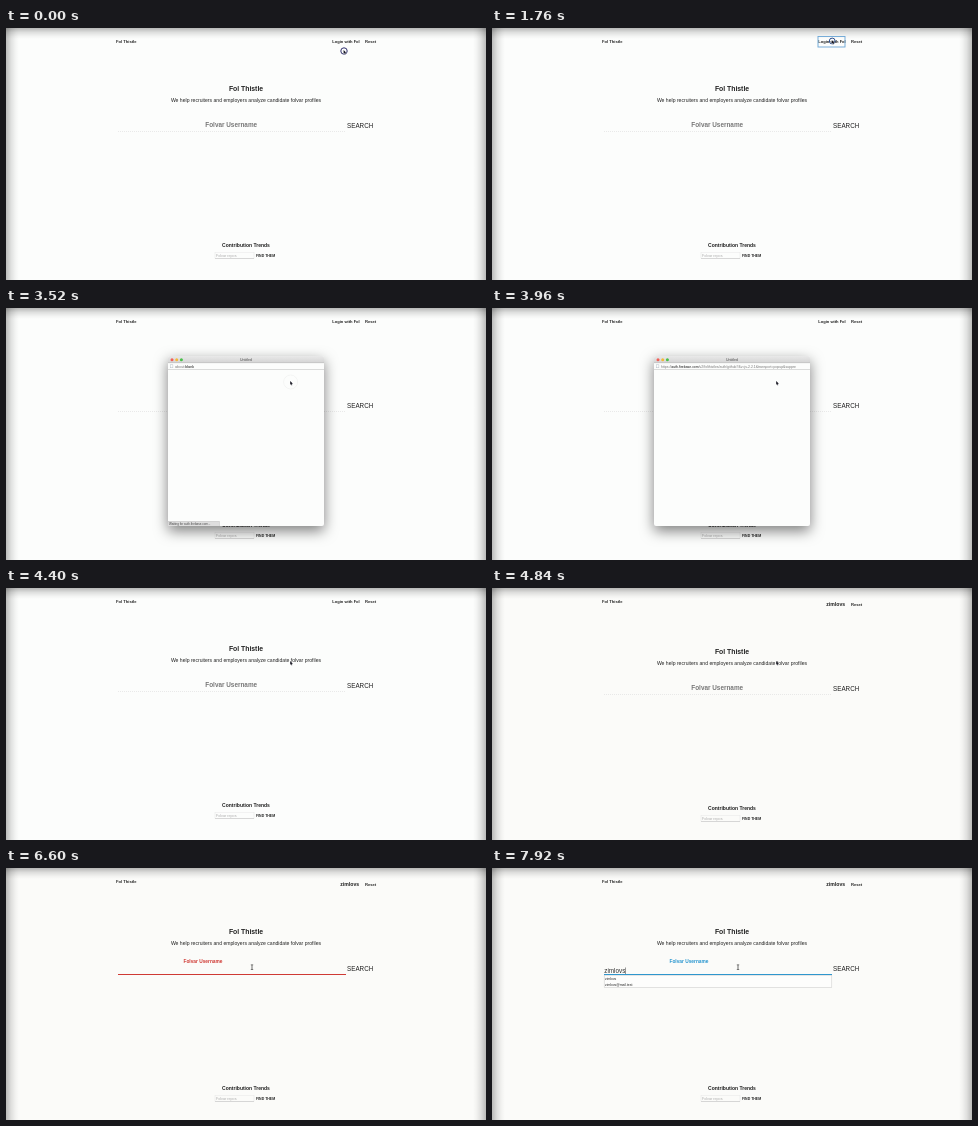
Animation, 480 px wide and 252 px high, one loop 8 s. Source, as an HTML page with a canvas:

```html
<!DOCTYPE html>
<html lang="en">
<head>
<meta charset="utf-8">
<title>Profile search</title>
<style>
  html, body { margin: 0; width: 100%; height: 100%; overflow: hidden; background: #fcfdfc; }
  canvas { display: block; width: 480px; height: 252px; }
</style>
</head>
<body>
<canvas id="stage"></canvas>
<script>
const W = 480, H = 252, LOOP = 8000, STEP = 440;
const canvas = document.getElementById('stage');
const ctx = canvas.getContext('2d');
const ratio = window.devicePixelRatio || 1;
canvas.width = W * ratio;
canvas.height = H * ratio;

const BRAND = 'Fol Thistle', USER = 'zimlovs';
const RED = '#cf3a35', BLUE = '#2795cf', INK = '#222';

// Pointer poses: start time, position, shape, ring radius, ring colour
const POINTER = [
  [0, 337.6, 22, 'arrow', 3.2, '#30306e'],
  [880, 243.5, 56.5, 'beam'],
  [1320, 337.4, 22, 'arrow', 4.7, 'rgba(70,70,110,.3)'],
  [1760, 339.8, 12, 'arrow', 2.9, '#2c4d8c'],
  [2200, 339.8, 12, 'arrow', 4.2, 'rgba(60,60,70,.42)'],
  [2640, 339.8, 12, 'arrow'],
  [3080, 284.2, 73, 'arrow'],
  [3520, 284.2, 73, 'arrow', 7, 'rgba(0,0,0,.035)'],
  [3960, 284.2, 73, 'arrow'],
  [5280, 246, 99.2, 'beam'],
  [5720, 246, 99.2, 'beam', 2.8, '#333'],
  [6160, 246, 99.2, 'beam', 4, 'rgba(60,60,60,.25)'],
  [6600, 246, 99.2, 'beam']
];

const lerp = (a, b, p) => a + (b - a) * p;

function text(str, x, y, size, { bold = false, color = INK, align = 'left' } = {}) {
  ctx.font = `${bold ? 'bold ' : ''}${size}px "Liberation Sans", Arial, sans-serif`;
  ctx.fillStyle = color;
  ctx.textAlign = align;
  ctx.fillText(str, x, y);
  return ctx.measureText(str).width;
}

function rect(x, y, w, h, color) {
  ctx.fillStyle = color;
  ctx.fillRect(x, y, w, h);
}

function frame(x, y, w, h, color, line = 0.5) {
  ctx.strokeStyle = color;
  ctx.lineWidth = line;
  ctx.strokeRect(x, y, w, h);
}

function disc(x, y, r, color) {
  ctx.fillStyle = color;
  ctx.beginPath();
  ctx.arc(x, y, r, 0, Math.PI * 2);
  ctx.fill();
}

function edge(x0, y0, x1, y1, strength) {
  const g = ctx.createLinearGradient(x0, y0, x1, y1);
  g.addColorStop(0, `rgba(0,0,0,${strength})`);
  g.addColorStop(0.4, `rgba(0,0,0,${strength * 0.42})`);
  g.addColorStop(0.75, `rgba(0,0,0,${strength * 0.12})`);
  g.addColorStop(1, 'rgba(0,0,0,0)');
  ctx.fillStyle = g;
  ctx.fillRect(0, 0, W, H);
}

function backdrop(t) {
  rect(0, 0, W, H, t < 4840 ? '#fcfdfc' : '#fbfbf9');
  edge(0, 0, 0, 11, 0.28);
  edge(0, 0, 13, 0, 0.26);
  edge(W, 0, W - 13, 0, 0.26);
}

function header(t) {
  text(BRAND, 110, 14.5, 4.1, { bold: true });
  if (t < 4840) {
    text('Login with Fol', 326.3, 15.4, 4.05, { bold: true });
    text('Reset', 359, 15.4, 4.1, { bold: true });
  } else {
    text(USER, 334.3, 17.6, 5.15, { bold: true });
    text('Reset', 359, 17.6, 4.1, { bold: true });
  }
  if (t === 1760) frame(326, 8.5, 27, 10.5, '#69a5d6', 0.9);
}

function searchField(t, shift) {
  const focused = t >= 5720;
  const typed = USER.slice(0, t < 7040 ? 0 : t < 7480 ? 2 : t < 7920 ? 5 : 7);
  const accent = typed ? BLUE : RED;
  const float = t < 5720 ? 0 : t < 6160 ? 0.36 : 1;

  text('Folvar Username', lerp(199.3, 177.5, float), lerp(98.5 + shift, 95, float),
    6.4 * lerp(1, 0.75, float), { bold: true, color: focused ? accent : '#777' });

  if (!focused) {
    ctx.setLineDash([1, 1]);
    ctx.strokeStyle = '#dcdddc';
    ctx.lineWidth = 0.6;
    ctx.beginPath();
    ctx.moveTo(112, 103.3 + shift);
    ctx.lineTo(340, 103.3 + shift);
    ctx.stroke();
    ctx.setLineDash([]);
  } else {
    rect(112, 106, 228, 1, accent);
    const width = text(typed, 112.3, 105, 6.3, { color: '#333' });
    if (t !== 6600) rect(112.3 + width, 99.5, 0.6, 6.5, typed ? '#555' : RED);
  }
  text('SEARCH', 341, 100.2 + shift, 6.3);

  if (typed) {
    rect(112, 107, 228, 12.5, '#fdfdfc');
    frame(112.2, 107.2, 227.6, 12.3, '#c8c8c8');
    text(USER, 113, 112, 3.4);
    text(USER + '@mail.test', 113, 117.9, 3.4);
  }
}

function page(t) {
  const shift = t < 4840 ? 0 : 3;
  header(t);
  text(BRAND, 240, 62.6 + shift, 6.85, { bold: true, align: 'center' });
  text('We help recruiters and employers analyze candidate folvar profiles',
    240, 74.2 + shift, 5.1, { align: 'center' });
  searchField(t, shift);
  text('Contribution Trends', 240, 218.7 + shift, 5, { bold: true, align: 'center' });
  text('Folvar repos', 210, 228.9 + shift, 3.7, { color: '#aaa' });
  frame(209, 224.4 + shift, 39, 6.4, '#e2e2e2', 0.4);
  rect(209, 230.4 + shift, 39, 0.5, '#bbb');
  text('FIND THEM', 250, 228.8 + shift, 3.5, { bold: true });
}

function popup(t) {
  const x = 162, y = 48, w = 156, h = 170;
  const blank = t >= 2640 && t < 3960;
  ctx.save();
  ctx.shadowColor = 'rgba(0,0,0,.5)';
  ctx.shadowBlur = 14 * ratio;
  ctx.shadowOffsetY = 5 * ratio;
  ctx.fillStyle = '#fcfdfc';
  ctx.beginPath();
  ctx.roundRect(x, y, w, h, 2);
  ctx.fill();
  ctx.restore();

  ctx.save();
  ctx.beginPath();
  ctx.roundRect(x, y, w, h, 2);
  ctx.clip();
  const bar = ctx.createLinearGradient(0, y, 0, y + 7);
  bar.addColorStop(0, '#e9e9e9');
  bar.addColorStop(1, '#d3d3d3');
  rect(x, y, w, 7, bar);
  rect(x, 54.6, w, 0.5, '#b5b5b5');
  rect(x, 61.3, w, 0.6, '#c4c4c4');
  ['#f25f57', '#f3b93c', '#48bf4a'].forEach((c, i) => disc(166 + i * 4.7, 51.7, 1.5, c));
  text('Untitled', 240, 53, 3.5, { align: 'center', color: '#444' });

  frame(164.6, 56.8, 2.3, 3, '#a9b5bd', 0.4);
  let left = 169;
  const parts = blank
    ? [['about:', '#777'], ['blank', '#111']]
    : [['https://', '#777'], ['auth.firebase.com', '#111'],
       ['/v2/folthistles/auth/github?&v=js-2.2.1&transport=popup&suppre', '#777']];
  for (const [str, color] of parts) left += text(str, left, 59.6, blank ? 3.7 : 3.45, { color });

  if (t < 3960) {
    rect(x, 213.2, 51.5, 4.8, '#dedede');
    frame(x, 213.2, 51.5, 5, '#b9b9b9', 0.4);
    text(blank ? 'Waiting for auth.firebase.com...' : 'Transferring from auth.firebase.com',
      163, 216.7, blank ? 3 : 2.6, { color: '#444' });
  }
  ctx.restore();
}

function pointer(t) {
  const [, x, y, shape, radius, color] = POINTER.findLast(p => p[0] <= t);
  if (radius) {
    ctx.strokeStyle = color;
    ctx.lineWidth = 1;
    ctx.beginPath();
    ctx.arc(x + (shape === 'arrow' ? 0.4 : 0), y + (shape === 'arrow' ? 1 : 0), radius, 0, Math.PI * 2);
    ctx.stroke();
  }
  if (shape === 'beam') {
    rect(x - 0.35, y - 2.3, 0.7, 4.6, '#333');
    rect(x - 1.2, y - 2.6, 2.4, 0.6, '#333');
    rect(x - 1.2, y + 2, 2.4, 0.6, '#333');
    return;
  }
  ctx.save();
  ctx.translate(x, y);
  ctx.beginPath();
  [[0, 0], [0, 3.8], [0.9, 3], [1.5, 4.4], [2.1, 4.1], [1.5, 2.8], [2.7, 2.7]]
    .forEach(p => ctx.lineTo(...p));
  ctx.closePath();
  ctx.strokeStyle = 'rgba(255,255,255,.8)';
  ctx.lineWidth = 0.6;
  ctx.stroke();
  ctx.fillStyle = '#151520';
  ctx.fill();
  ctx.restore();
}

function draw(now) {
  const t = Math.floor((now % LOOP) / STEP) * STEP;
  ctx.setTransform(ratio, 0, 0, ratio, 0, 0);
  backdrop(t);
  page(t);
  if (t >= 2200 && t < 4400) popup(t);
  pointer(t);
}

const start = performance.now();
function tick() {
  draw(performance.now() - start);
  requestAnimationFrame(tick);
}
tick();
</script>
</body>
</html>
```
